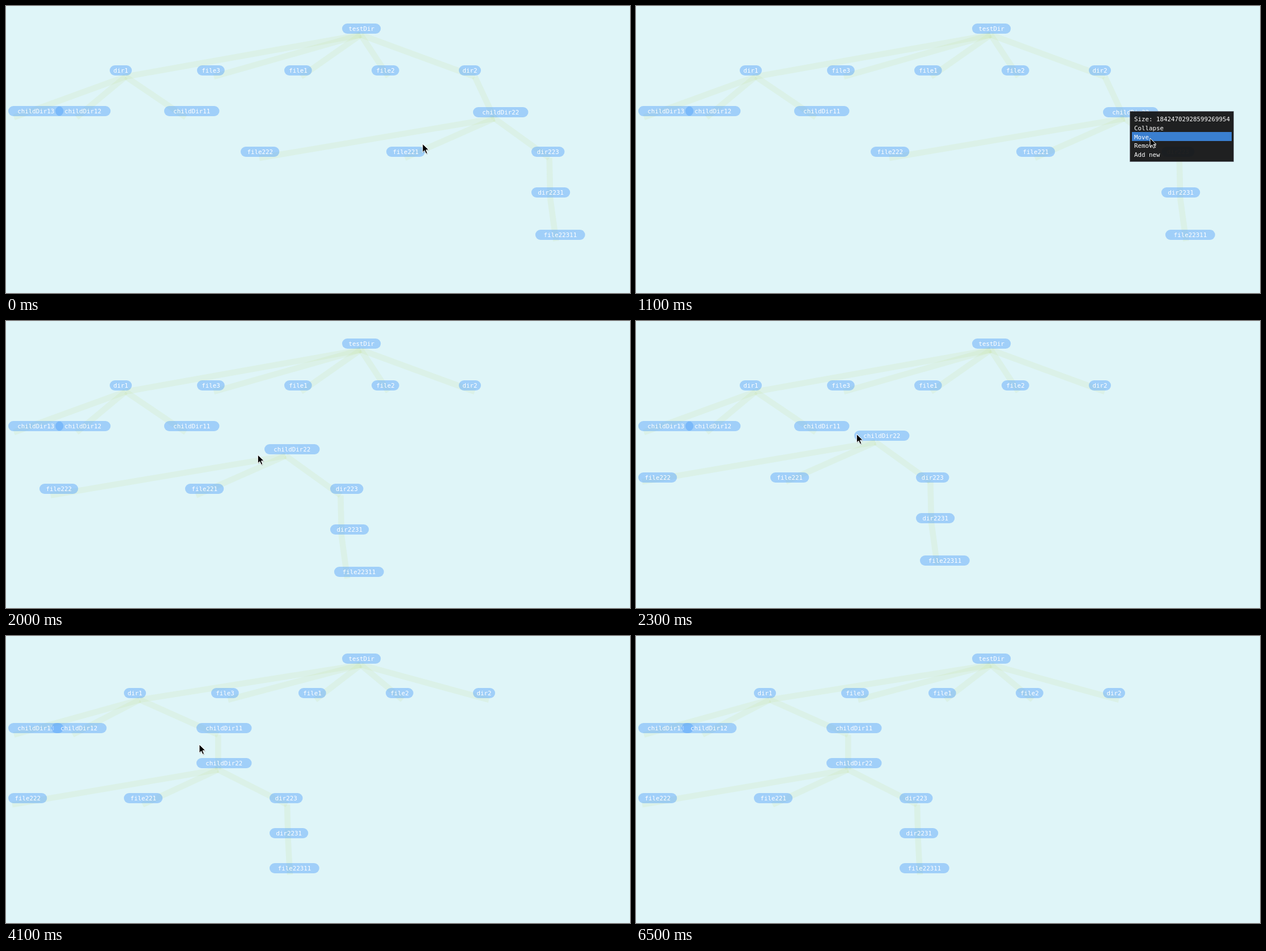
These frames come from a looping animation (1101x508 px, 6600 ms). An HTML page:

```html
<!DOCTYPE html>
<html lang="en">
<head>
<meta charset="utf-8">
<title>Directory tree</title>
<style>
  html, body { margin: 0; width: 100%; height: 100%; overflow: hidden; background: #dff5f8; }
  svg { display: block; width: 1101px; height: 508px; }
  text { font: 10.8px "DejaVu Sans Mono", monospace; fill: #fff; white-space: pre; }
  line { stroke: #c8e2a4; stroke-opacity: .2; stroke-width: 10.5; }
  .pill { fill: #4296fa; }
</style>
</head>
<body>
<svg id="stage" viewBox="0 0 1101 508"></svg>
<script>
const LOOP = 6600, STEP = 100;
const MENU = 700, PICK = 1500, DROP = 4100;
const CHAR = 6.5, PILL_H = 18, EDGE = 4, ROW = 15.75;
const SPREAD = 770, LEVEL = 61.85;
const GRIP = { x: 20, y: 19 };
const stage = document.getElementById('stage');

function set(el, attrs) {
  for (const k in attrs) el.setAttribute(k, attrs[k]);
}
function add(parent, tag, attrs = {}, label = '') {
  const el = document.createElementNS('http://www.w3.org/2000/svg', tag);
  set(el, attrs);
  if (label) el.textContent = label;
  return parent.appendChild(el);
}
function show(el, on) {
  el.setAttribute('visibility', on ? 'visible' : 'hidden');
}

// drop, shift and squeeze describe how the folder's children are first laid out.
const folder = (name, drop, shift, squeeze, ...kids) => ({ name, drop, shift, squeeze, kids });
const file = name => ({ name, kids: [] });

const branch = folder('childDir22', 70, -25, 1,
  file('file222'), file('file221'),
  folder('dir223', 72, 0, 1, folder('dir2231', 75, 7, 1, file('file22311'))));
const target = file('childDir11');
const root = folder('testDir', 74, -25, 1,
  folder('dir1', 72, 0, .75, file('childDir13'), file('childDir12'), target),
  file('file3'), file('file1'), file('file2'),
  folder('dir2', 74, 25, 1, branch));

// A lone child sits below its parent; several share the spread evenly.
const offset = (i, count) => count > 1 ? (i - count / 2) * SPREAD / count : 0;

function layout(node, key, rule) {
  node.kids.forEach((kid, i) => {
    const p = node[key], r = rule(node);
    kid.parent = node;
    kid[key] = { x: p.x + offset(i, node.kids.length) * r.squeeze + r.shift, y: p.y + r.drop };
    layout(kid, key, rule);
  });
}
const flatten = n => [n, ...n.kids.flatMap(flatten)];

root.before = root.after = { x: 593.6, y: 31 };
layout(root, 'before', n => n);
const nodes = flatten(root), carried = new Set(flatten(branch));
root.kids[4].kids = [];
target.kids = [branch];
layout(root, 'after', () => ({ squeeze: 1, shift: 0, drop: LEVEL }));
branch.parent = root.kids[4];

// from, to, end point
const startPoint = { x: 736, y: 245 };
const moves = [
  [0, 600, 870, 185],
  [800, 1100, 908, 235],
  [1200, 1300, 907, 233],
  [1450, 2050, 436, 238],
  [2100, 2350, 385, 197],
  [2500, 2720, 342, 193],
  [4420, 5020, 487, 286],
  [5050, 5480, 379, 230],
  [5750, 6500, 42, -28]
];
function cursorAt(t) {
  let { x, y } = startPoint;
  for (const [from, to, endX, endY] of moves) {
    const k = Math.min(1, Math.max(0, (t - from) / (to - from)));
    const ease = k * k * (3 - 2 * k);
    x += (endX - x) * ease;
    y += (endY - y) * ease;
  }
  return { x, y };
}

// The carried branch trails behind the cursor.
function place(n, t, lag = 58) {
  if (t >= DROP) return n.after;
  if (t < PICK || !carried.has(n)) return n.before;
  const c = cursorAt(t - lag);
  return {
    x: n.before.x - branch.before.x + c.x - GRIP.x,
    y: n.before.y - branch.before.y + c.y - GRIP.y
  };
}
function pillAt(n, t) {
  const p = place(n, t, n === branch ? 58 : 76);
  return { x: Math.max(EDGE, Math.floor(p.x)), y: Math.floor(p.y) };
}
function anchor(n, t) {
  const p = place(n, t);
  return { x: p.x < 0 ? EDGE + n.name.length : p.x + n.pad + 21, y: p.y + 20 };
}
function parentOf(n, t) {
  if (n !== branch || t < PICK) return n.parent;
  return t < DROP ? null : target;
}

const links = add(stage, 'g'), pills = add(stage, 'g');
for (const n of nodes) {
  const textW = n.name.length * CHAR;
  n.pad = textW / 4;
  n.w = textW * 1.5;
  if (n !== root) n.link = add(links, 'line');
}
// Deeper nodes lie on top, so the branch covers its drop target.
for (const n of nodes) {
  n.group = add(pills, 'g');
  n.pill = add(n.group, 'rect', { class: 'pill', width: n.w, height: PILL_H, rx: 9 });
  add(n.group, 'text', { x: n.pad, y: 13 }, n.name);
}

const menu = add(stage, 'g');
add(menu, 'rect', {
  x: 871.5, y: 186.5, width: 183, height: 89,
  fill: '#141414', 'fill-opacity': .94, stroke: '#6e6e80', 'stroke-opacity': .5
});
const rowBar = add(menu, 'rect', { x: 875, width: 176, height: 16, fill: '#3a7fd0' });
['Size: 18424702928599269954', 'Collapse', 'Move', 'Remove', 'Add new'].forEach((label, i) =>
  add(menu, 'text', { x: 879, y: 204 + i * ROW }, label));

const arrow = 'M0 0V15L3.5 11.8L6 17.5L8.5 16.4L6.1 10.8H11Z';
const cursor = add(stage, 'g');
add(cursor, 'path', { d: arrow, transform: 'translate(1 1.5)', opacity: .2 });
add(cursor, 'path', { d: arrow, fill: '#000', stroke: '#fff', 'stroke-width': 1 });

// Hover reacts one step after the cursor arrives.
function hovered(n, t) {
  const menuOpen = t >= MENU && t < PICK;
  const dragging = t >= PICK && t < DROP;
  if (menuOpen || (dragging && carried.has(n))) return false;
  const c = cursorAt(t - STEP), p = pillAt(n, t);
  return c.x >= p.x && c.x <= p.x + n.w && c.y >= p.y && c.y <= p.y + PILL_H;
}

function draw(t) {
  for (const n of nodes) {
    const p = pillAt(n, t);
    set(n.group, { transform: `translate(${p.x} ${p.y})` });
    set(n.pill, { 'fill-opacity': hovered(n, t) ? 1 : .4 });
    if (!n.link) continue;
    const parent = parentOf(n, t);
    show(n.link, parent);
    if (parent) {
      const a = anchor(parent, t), b = anchor(n, t);
      set(n.link, { x1: a.x, y1: a.y, x2: b.x, y2: b.y });
    }
  }

  const c = cursorAt(t);
  set(cursor, { transform: `translate(${c.x - 1} ${c.y - 1})` });

  const open = t >= MENU && t < PICK;
  const row = Math.floor((c.y - 191.5) / ROW);
  show(menu, open);
  show(rowBar, open && c.x > 875 && row > 0);
  set(rowBar, { y: Math.round(191.5 + row * ROW) });
}

const start = performance.now();
function tick() {
  const t = (performance.now() - start) % LOOP;
  draw(Math.floor(t / STEP) * STEP);
  requestAnimationFrame(tick);
}
tick();
</script>
</body>
</html>
```
